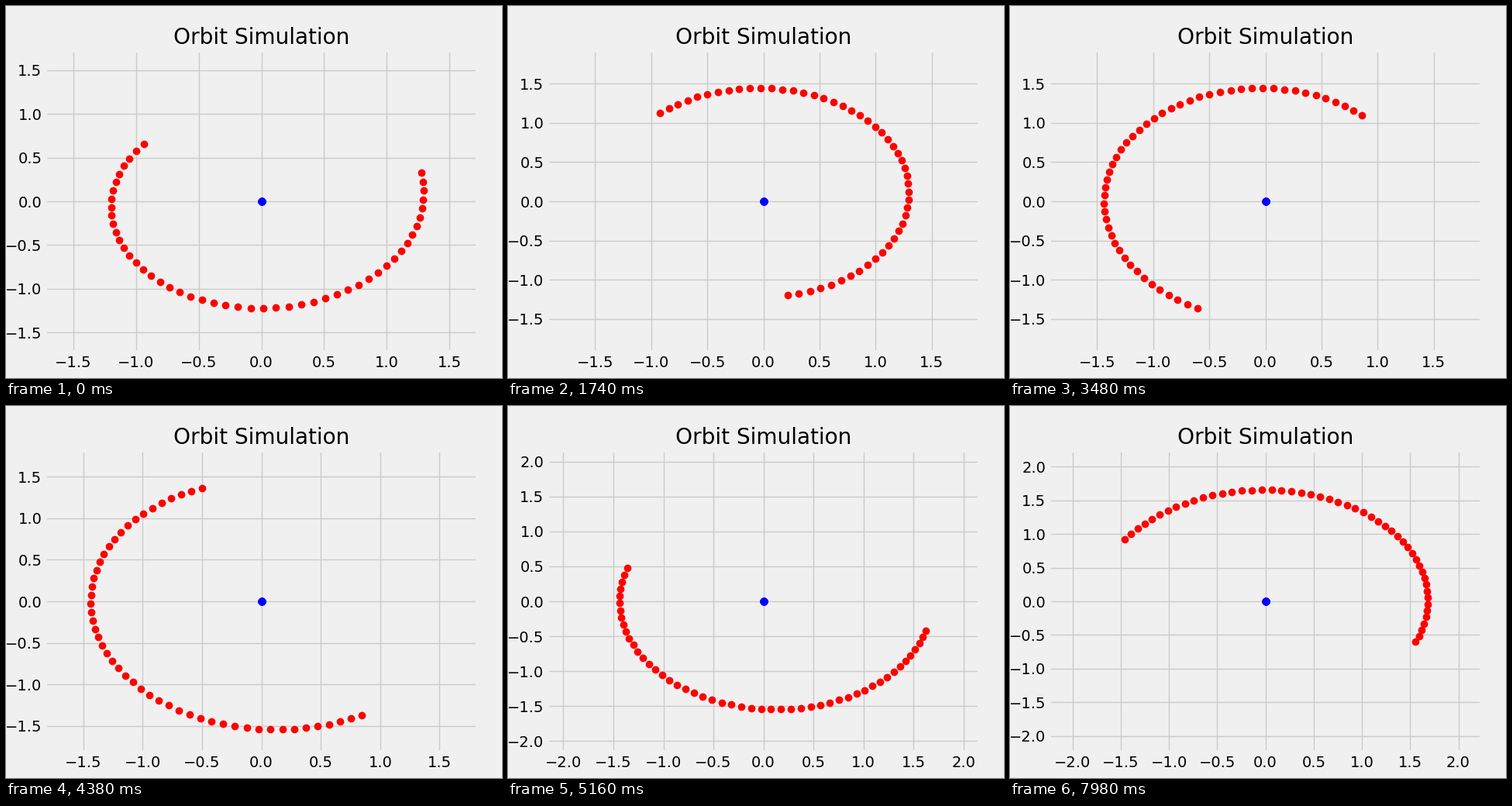
Write a matplotlib script that moves like this. It is 640 px wide and 480 px high and loops after 8 s.

```python
import numpy as np
import matplotlib.pyplot as plt
from matplotlib.animation import FuncAnimation

DT = 0.1          # integration step
TRAIL = 50        # visible positions
START = 26        # first position in the opening view
HOLD = 3          # ticks per integration step
INTERVAL = 20     # ms per tick
TICKS = 400
MARGIN = 1.33


def orbit(steps):
    """Integrate a body pulled to the centre by a 1/r force."""
    pos, vel = np.array([1.0, 0.0]), np.array([0.0, 1.0])
    path = [pos]
    for _ in range(steps):
        acc = -pos / (pos @ pos)
        pos = pos + vel * DT + 0.5 * acc * DT**2
        vel = vel + acc * DT
        path.append(pos)
    return np.array(path)


path = orbit(START + TRAIL + TICKS // HOLD + 1)

plt.style.use("fivethirtyeight")
fig, ax = plt.subplots(figsize=(6.4, 4.8), dpi=100)
ax.set_title("Orbit Simulation")
body, = ax.plot([], [], "ro")
sun, = ax.plot(np.zeros(TRAIL), np.zeros(TRAIL), "bo")


def update(tick):
    first = START + tick // HOLD
    trail = path[first:first + TRAIL]
    body.set_data(trail[:, 0], trail[:, 1])
    lim = MARGIN * trail.max()
    ax.set_xlim(-lim, lim)
    ax.set_ylim(-lim, lim)
    return body, sun


anim = FuncAnimation(fig, update, frames=TICKS, interval=INTERVAL,
                     init_func=lambda: update(0), repeat=True,
                     repeat_delay=0, cache_frame_data=False)
plt.show()
```
